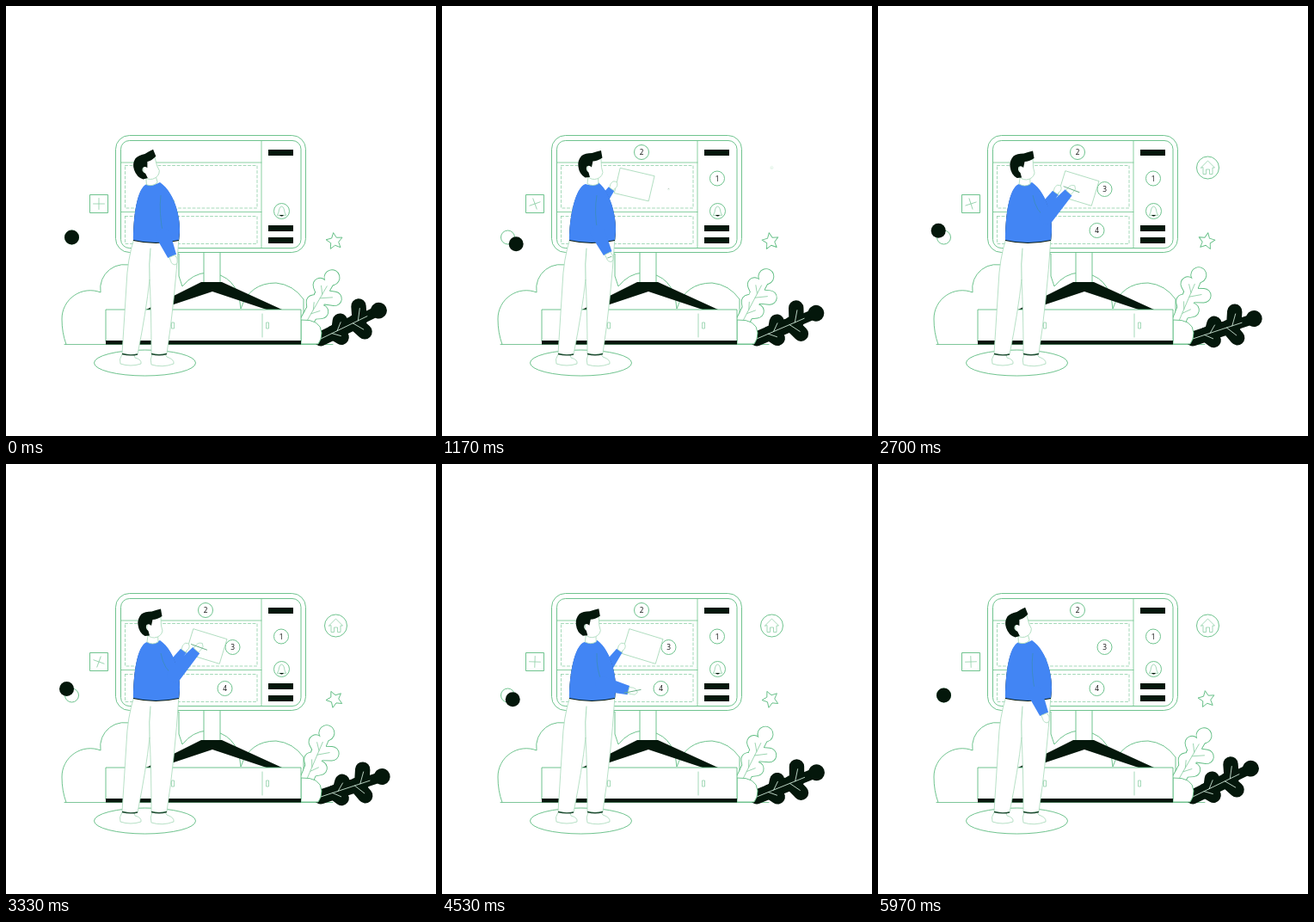
Recreate the animation shown at these times as an HTML page. Size 500x500 px, loop 6 s.

```html
<!DOCTYPE html>
<html lang="en">
<head>
<meta charset="utf-8">
<title>Planning on a screen</title>
<style>
  html, body { margin: 0; width: 100%; height: 100%; overflow: hidden; background: #fff; }
  svg { display: block; width: 100vw; height: 100vh; }
  .o { fill: #fff; stroke: #5fbd82; stroke-width: .9; stroke-linejoin: round; }
  .l { fill: none; stroke: #8fd0a7; stroke-width: .8; stroke-linecap: round; }
  .p { fill: #fff; stroke: #a5d9b8; stroke-width: .8; stroke-linejoin: round; }
  .d { fill: #04170b; }
  .b { fill: #4285f4; }
  .leaf { fill: none; stroke-linecap: round; stroke-linejoin: round; }
  text { font: 8.3px "Open Sans", "Noto Sans", sans-serif; fill: #111; text-anchor: middle; }
</style>
</head>
<body>
<svg viewBox="0 0 500 500">
  <!-- clouds -->
  <path class="o" d="M70 393.500 Q65 380 65 364 A33 33 0 0 1 110 333 A28 28 0 0 1 149 303 Q160 287 201 288 V314 L205 326 Q217 311 234 310 Q270 312 273 352 Q283 322 314 322 Q334 324 346 341 V393"/>
  <path class="l" style="stroke:#5fb981" d="M68 393.500 H380"/>

  <g id="paleLeaf"></g>
  <g id="darkLeaf"></g>
  <path class="o" d="M343 365 Q366 364 367 380 Q367 388 363 393 H343Z"/>

  <!-- stand and cabinet -->
  <path class="o" d="M230 285 H249 V322 H230Z"/>
  <path class="d" d="M163 353 L227 321 H251 L321 353 H303 L240 332 L177 353Z"/>
  <path class="o" d="M116 353 H343 V390 H116Z"/>
  <path class="d" d="M116 389 H343 V393.500 H116Z"/>
  <path class="l" d="M189 358 V385 M298 358 V385 M193 368 h2.500 v7 h-2.500Z M303 368 h2.500 v7 h-2.500Z"/>

  <!-- monitor -->
  <rect class="o" x="127.500" y="150.500" width="221" height="136" rx="16"/>
  <rect class="o" x="133.500" y="156.500" width="209.500" height="125" rx="10"/>
  <path class="l" style="stroke:#6cc48c" d="M297 156.500 V281.500 M133.500 182 H297 M133.500 239.500 H297"/>
  <g class="l" stroke-dasharray="3 2.500">
    <rect x="138.500" y="185.500" width="153.500" height="49.500"/>
    <rect x="138.500" y="244.500" width="153.500" height="32"/>
  </g>
  <path class="d" d="M305 167 h29 v7 h-29Z M305 255 h29 v7 h-29Z M305 269 h29 v7 h-29Z"/>
  <circle class="o" cx="320.500" cy="238.500" r="9"/>
  <path class="l" d="M315.500 243 Q317.500 240 317.500 237 Q318 233.500 320.500 233 Q323 233.500 323.500 237 Q323.500 240 325.500 243Z"/>
  <path class="d" d="M318 243 H323 Q320.500 246 318 243Z"/>
  <g id="badges"></g>

  <!-- floating shapes -->
  <g id="house">
    <circle class="o" r="13"/>
    <path class="l" d="M-8 0 L0 -8 L8 0 H5.500 V7.500 H2 V2 H-2 V7.500 H-5.500 V0Z"/>
  </g>
  <path class="o" id="star"/>
  <rect class="o" x="97.500" y="219.500" width="21" height="21"/>
  <path class="l" id="plus" d="M-6.500 0 H6.500 M0 -6.500 V6.500"/>
  <circle class="o" cx="76.500" cy="269" r="8"/>
  <circle class="d" id="dot" r="8.500"/>

  <!-- man -->
  <ellipse class="o" cx="161.500" cy="415" rx="59" ry="15"/>
  <path class="p" d="M135 405 Q131 411 133 416 Q145 420 157 416 Q158 411 150 409 L149 405Z"/>
  <path class="p" d="M170 405 Q167 411 169 417 Q182 421 195 416 Q196 411 187 408 L185 405Z"/>
  <path class="p" d="M149 270 Q141 295 140 325 L135 404 Q144 407 153 405 Q163 355 167 318 Q169 355 169 404 Q178 407 187 404 Q196 345 201 270Z"/>
  <path class="l" d="M167 318 Q166 300 168 282"/>
  <path d="M135 404.500 Q144 407 153 405 M169 404.500 Q178 407 187 404.500" fill="none" stroke="#1d4a30" stroke-width="1.300"/>

  <path class="p" id="paper" d="M-20.500 -15 H20.500 V15 H-20.500Z"/>
  <path class="b" id="farArm"/>
  <path class="p" id="farHand" d="M0 -3 Q5 -6 9 -4 L11 -1 Q11 3 6 4 L0 3Z"/>
  <path class="d" id="hem" transform="translate(0 1)"/>
  <path class="b" id="torso"/>
  <path id="crease" fill="none" stroke="#3b8fb0" stroke-width=".7"/>
  <path class="b" id="nearArm"/>
  <path class="p" id="nearHand" d="M0 -4 Q6 -6 10 -3 L12 0 Q10 5 5 4 L0 4Z"/>
  <path id="pen" fill="none" stroke="#6cb088" stroke-width=".9"/>

  <g id="head">
    <path class="p" d="M164 196 L162.500 207 Q169 211 175.500 207 L175 198Z"/>
    <path class="p" d="M163 184 L170 178 L178.500 178 L179 188 L180.500 194 Q179 201 171 202 Q164 202 162 196Z"/>
    <path class="d" d="M180 177 L178.500 168.500 Q174 169.500 168 171.500 Q160 171.500 156 174.500 Q151 180 152 187 Q153 196 160 200 L165.500 199.500 L164 194 Q160 191 162 187 Q165 185 167.500 188 L169 181 Q174 181 180 177Z"/>
  </g>
</svg>
<script>
const LOOP = 6000;
const $ = id => document.getElementById(id);
const clamp = v => Math.min(1, Math.max(0, v));
const ease = v => v * v * (3 - 2 * v);
const ramp = (t, from, to) => ease(clamp((t - from) / (to - from)));
const mix = (a, b, k) => a + (b - a) * k;
const path = (id, d) => $(id).setAttribute('d', d);
const put = (id, x, y, turn = 0, size = 1) =>
  $(id).setAttribute('transform', `translate(${x} ${y}) rotate(${turn}) scale(${size})`);

// A leaf along the x axis: a spine, a round tip and two pairs of growing lobes
function leaf(id, len, spread, fill, edge, vein) {
  const parts = [[`M0 0H${len * .5}`, 16], [`M0 0H${len}`, 11], [`M${len} 0h.01`, 18]];
  let veins = `M0 0H${len * .8}`;
  for (const pair of [0, 1]) {
    for (const side of [-1, 1]) {
      const u = len * (.3 + .36 * pair + (side < 0 ? .09 : 0));
      const n = side * (9 + 6 * pair) * (side < 0 ? spread : 1);
      parts.push([`M${u - 6} 0L${u} ${n}`, 16.5]);
      veins += `M${u - 8} 0L${u} ${n * .8}`;
    }
  }
  const layer = (color, extra) => parts.map(([d, w]) =>
    `<path d="${d}" stroke="${color}" stroke-width="${w + extra}"/>`).join('');
  $(id).innerHTML = `<g class="leaf">${layer(edge, .9)}${layer(fill, -.9)}
    <path d="${veins}" stroke="${vein}" stroke-width=".8"/></g>`;
}
leaf('paleLeaf', 58, .5, '#fff', '#5fbd82', '#8fd0a7');
leaf('darkLeaf', 75, 1, '#04170b', '#04170b', '#cfe8d8');

path('star', 'M' + Array.from({ length: 10 }, (_, i) => {
  const r = i % 2 ? 4.8 : 10, a = Math.PI * (i / 5 - .5);
  return `${r * Math.cos(a)} ${r * Math.sin(a)}`;
}).join('L') + 'Z');

const badges = [[320, 200.5], [232, 170], [263.5, 213], [254.5, 261]];
$('badges').innerHTML = badges.map((_, i) =>
  `<g id="badge${i}"><circle class="o" r="8.500"/><text y="3">${i + 1}</text></g>`).join('');

// Tapered sleeve from a round elbow; returns where the hand starts
function arm(name, x, y, turn, len, wide, narrow) {
  const a = turn * Math.PI / 180, c = Math.cos(a), s = Math.sin(a);
  const at = (along, across) => `${x + c * along - s * across} ${y + s * along + c * across}`;
  path(name + 'Arm', `M${at(0, -wide)}L${at(len, -narrow)}L${at(len, narrow)}L${at(0, wide)}` +
    `A${wide} ${wide} 0 0 1 ${at(0, -wide)}Z`);
  put(name + 'Hand', x + c * len, y + s * len, turn, .9);
  return [x + c * (len + 5), y + s * (len + 5)];
}

function drawMan(t) {
  const lift = ramp(t, 0, 1000) - ramp(t, 5000, 6000);
  const write = ramp(t, 1000, 2000) - ramp(t, 4000, 5000);
  const stroke = ramp(t, 2000, 3000) - ramp(t, 3000, 4000);
  const lean = lift - write;

  const x = 3 * lean;
  const shirt = `M${164 + x} 207C${152 + x} 211 148 245 148 272Q174 278 201 272` +
    `C205 252 198 218 ${179 + x} 205Q${171 + x} 210 ${164 + x} 207Z`;
  path('torso', shirt);
  path('hem', shirt);
  $('head').setAttribute('transform',
    `translate(${7 * lean + 2 * stroke} ${-lean / 2}) rotate(${-12 * (1 - lift)} 167 203)`);

  // The paper rises from behind the body and the far hand holds its edge
  const drift = ramp(t, 0, 2500);
  const px = mix(175, 216 + 17 * drift, lift), py = mix(241, 204 + 8 * drift, lift);
  put('paper', px, py, (10 + 7 * drift) * lift);
  arm('far', px - 39 * lift, py + 22 * lift, -54, 21 * lift, 6, 4);

  const ex = mix(183 - 3 * lift, 195 + stroke, write);
  const ey = mix(267 - 2 * lift, 244 + 2 * stroke, write);
  const turn = mix(67 + 8 * lift, -59 + 14 * stroke, write);
  path('crease', `M180 220Q${ex / 2 + 86} 240 ${ex} ${ey}`);
  const [hx, hy] = arm('near', ex, ey, turn, mix(26, 37 + 2 * stroke, write), 8.5, 5.3);
  const half = 10 * (ramp(t, 1000, 1500) - ramp(t, 5000, 5500));
  put('pen', hx, hy, mix(-25, 5 + 20 * stroke, write));
  path('pen', `M${-half} 0H${half}`);
}

function draw(t) {
  const pop = start => ramp(t, start, start + 400);
  badges.forEach(([x, y], i) => put('badge' + i, x, y, 0, pop(200 + 440 * i)));
  put('house', 383.5, 188, 0, pop(1080));

  const turn = t / LOOP * 360;
  put('plus', 108, 230, turn);
  put('star', 382, 273.5, turn - 8);

  // Swings out and back every two seconds, alternating sides
  const swing = ease(1 - Math.abs(t % 2000 / 1000 - 1));
  const back = Math.floor(t / 2000) === 1;
  put('dot', 76.5 + swing * (back ? -8 : 10.5), 269 + swing * (back ? -10 : 8.5));

  const sway = ease(1 - Math.abs(t / 3000 - 1));
  put('paleLeaf', 350, 366, -60 - 7 * sway);
  put('darkLeaf', 366, 387, -26 + 8 * sway);
  drawMan(t);
}

const begin = performance.now();
function tick() {
  draw((performance.now() - begin) % LOOP);
  requestAnimationFrame(tick);
}
tick();
</script>
</body>
</html>
```
